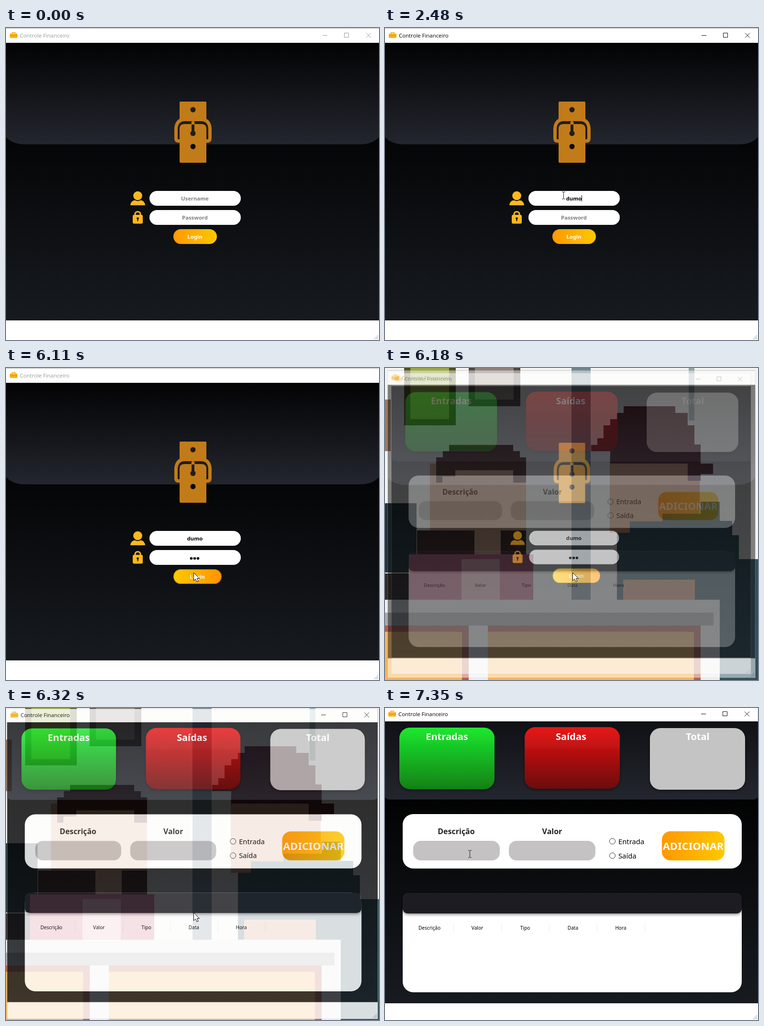
An HTML page that plays this animation: 780 px wide and 653 px high, repeating every 8 s.

```html
<!DOCTYPE html>
<html lang="pt">
<head>
<meta charset="utf-8">
<title>Controle Financeiro</title>
<style>
  html, body { margin: 0; width: 100%; height: 100%; overflow: hidden; background: #fff; }
  svg { display: block; width: 780px; height: 653px; }
  text { font-family: "Noto Sans", sans-serif; }
  .title { font: 11.4px "Open Sans", sans-serif; }
  .bold { font-weight: 700; font-size: 11.3px; text-anchor: middle; }
  .big { font-weight: 700; font-size: 20px; text-anchor: middle; fill: #fff; }
  .label { font-weight: 700; font-size: 16px; text-anchor: middle; fill: #222; }
  .column { font-size: 10.1px; text-anchor: middle; }
  .radio { font-size: 14.8px; }
</style>
</head>
<body>
<svg id="stage" viewBox="0 0 780 653"></svg>
<script>
const LOOP = 8000;
const stage = document.getElementById('stage');

const box = (x, y, w, h, fill, r = 0, extra = '') =>
  `<rect x="${x}" y="${y}" width="${w}" height="${h}" rx="${r}" fill="${fill}" ${extra}/>`;
const dot = (x, y, r, fill, extra = '') => `<circle cx="${x}" cy="${y}" r="${r}" fill="${fill}" ${extra}/>`;
const line = (d, stroke, width = 1) => `<path d="${d}" fill="none" stroke="${stroke}" stroke-width="${width}"/>`;
const text = (cls, x, y, s, extra = '') => `<text class="${cls}" x="${x}" y="${y}" ${extra}>${s}</text>`;
const gradient = (id, from, to, horizontal) =>
  `<linearGradient id="${id}" x2="${horizontal ? 1 : 0}" y2="${horizontal ? 0 : 1}">
    <stop stop-color="${from}"/><stop offset="1" stop-color="${to}"/></linearGradient>`;

const defs = `<defs>
  ${gradient('flap', '#030304', '#23262e')}
  ${gradient('shortFlap', '#101115', '#23262e')}
  <linearGradient id="floor" x2="0" y2="1"><stop offset=".2" stop-color="#000"/>
    <stop offset="1" stop-color="#171b20"/></linearGradient>
  ${gradient('green', '#1ce82f', '#118016')}
  ${gradient('red', '#e81717', '#6b0707')}
  ${gradient('warm', '#ff9800', '#ffc800', true)}
  ${gradient('warmBack', '#ffc800', '#ff9300', true)}
  <filter id="shadow" x="-10%" y="-20%" width="120%" height="150%">
    <feDropShadow dx="0" dy="2" stdDeviation="3" flood-opacity=".5"/></filter>
</defs>`;

function titleBar(left, dy, name) {
  const y = 15.5 + dy, x = left + 659;
  return box(left + 8 - 8, 0, 780, 31 + dy, '#fff') +
    box(left + 8, y - 4, 16, 9.5, '#ffb21c', 1.5) + box(left + 8, y, 16, 1, '#d98500') +
    line(`M${left + 13} ${y - 4}v-2h6v2`, '#f0a010', 1.6) +
    `<g id="${name}Title">${text('title', left + 29, y + 4.5, 'Controle Financeiro')}</g>
    <g id="${name}Buttons" stroke="#111" fill="none">
      <path d="M${x + 3} ${y}h10M${x + 48.5} ${y - 5}h9v9h-9zM${x + 94} ${y - 5}l10 10m0 -10l-10 10"/></g>`;
}

const grip = [[776, 643], [773, 646], [776, 646], [770, 649], [773, 649], [776, 649]]
  .map(([x, y]) => box(x, y, 2, 2, '#bbb')).join('');

function buckle() {
  const gold = '#c27b19', dark = '#211d1b';
  return box(363, 154, 56, 40, gold, 2) +
    box(358, 195, 66, 40, dark, 9) +
    line('M366 236.5H361Q355.5 236.5 355.5 231V210Q357 191.5 374 191.5H408Q425 191.5 426.5 210V231Q426.5 236.5 421 236.5H416', gold, 7) +
    `<path d="M363 211Q363 201 373 201H409Q419 201 419 211V280Q419 282 417 282H365Q363 282 363 280Z" fill="${gold}"/>` +
    dot(391, 198.5, 3.5, gold) + box(388, 202, 6, 18, dark) +
    dot(391, 171, 5.5, dark) + dot(391, 220.5, 5.5, dark) + dot(391, 248, 5.5, '#090808');
}

const loginWindow = box(0, 0, 780, 653, '#fff', 0, 'stroke="#bbb"') + titleBar(0, 0, 'login') +
  box(0, 0, 780, 1, '#aaa') +
  box(0, 31, 780, 581, 'url(#floor)') +
  '<path d="M0 31H780V228Q767 243.500 740 243.500H40Q13 243.500 0 228Z" fill="url(#flap)"/>' +
  buckle() +
  `<g fill="#ffb81c"><circle cx="275.500" cy="351" r="9.300"/>
    <path d="M260 371Q261 361 270 360.500Q275.500 364 281 360.500Q290 361 291 371Z"/>
    <rect x="265" y="391" width="21" height="18.500" rx="3"/></g>` +
  line('M270 392V389.5a5.500 5 0 0 1 11 0V392', '#ffb81c', 3) +
  dot(275.5, 398.5, 2.3, '#111') + box(274.5, 399, 2, 5.5, '#111') +
  box(300, 341, 191, 31, '#fff', 15.5) + box(300, 381, 191, 31, '#fff', 15.5) +
  '<g id="fields"></g><g id="loginButton"></g>' + box(0, 612, 780, 41, '#fff') + grip;

const columns = ['Descrição', 'Valor', 'Tipo', 'Data', 'Hora'].map((name, i) =>
  text('column', 93 + 100 * i, 464, name) + box(143 + 100 * i, 448, 1, 23, '#eee')).join('');
const radio = (y, name) =>
  dot(475.5, y, 6, '#fff', 'stroke="#333"') + text('radio', 488, y + 5.5, name);

const mainWindow = box(0, 0, 780, 653, '#fff', 0, 'stroke="#bbb"') + titleBar(-1, -3, 'main') +
  box(0, 28, 780, 590, 'url(#floor)') +
  '<path d="M0 28H780V187Q776 191.500 770 191.500H10Q4 191.500 0 187Z" fill="url(#shortFlap)"/>' +
  `<g filter="url(#shadow)">${box(30, 41, 199, 129, 'url(#green)', 22)}
    ${box(292, 40, 199, 129, 'url(#red)', 22)}${box(554, 42, 199, 129, '#c4c4c4', 22)}</g>` +
  text('big', 129.5, 67, 'Entradas') + text('big', 389, 67, 'Saídas') + text('big', 654, 67, 'Total') +
  box(37, 222, 709, 114, '#fff', 22) +
  text('label', 149, 264, 'Descrição') + text('label', 349.5, 264, 'Valor') +
  box(59, 278, 181, 41, '#c4c2c2', 16) + box(259, 278, 181, 41, '#c4c2c2', 16) +
  radio(279, 'Entrada') + radio(309, 'Saída') +
  box(579, 258, 131, 61, 'url(#warm)', 18) +
  text('big', 644.5, 297, 'ADICIONAR', 'style="font-size:22px"') +
  box(37, 387, 709, 208, '#fff', 22) +
  box(37, 387, 709, 43, '#1c1d21', 10, 'filter="url(#shadow)"') +
  columns + box(0, 618, 780, 35, '#fff') + grip;

// Blocky desktop scene behind the windows: two plain figures at a table.
const desktop = box(0, 0, 780, 653, '#f4f4f2') +
  box(0, 66, 12, 108, '#9a7a62') + box(40, 0, 108, 120, '#4c4a14') + box(53, 0, 81, 107, '#9aa83c') +
  box(175, 0, 108, 80, '#4a403c') + box(188, 0, 81, 66, '#8c8078') +
  box(390, 0, 40, 485, '#6d8390') + box(635, 0, 12, 110, '#8ca6aa') +
  box(0, 283, 66, 145, '#22333a') + box(0, 430, 50, 110, '#332826') +
  box(94, 200, 201, 200, '#dca684') + box(67, 340, 120, 80, '#40201a') + box(242, 340, 53, 80, '#40201a') +
  '<path d="M107 240V187H121V174H134V161H268V174H282V187H295V240H268V214H147V227H120V240Z" fill="#4a2018"/>' +
  box(50, 390, 260, 95, '#c4607c') + box(160, 400, 80, 85, '#eab0b8') +
  box(470, 185, 188, 160, '#d2946f') +
  '<path d="M431 174V161H444V147H457V120H471V107H485V94H499V80H607V94H633V120H647V160H660V200H686V222H660V236H633V200H471V174Z" fill="#501a20"/>' +
  '<path d="M485 485V345H512V321H580V305H660V280H700V320H726V350H740V400H780V653H700V485Z" fill="#30505a"/>' +
  box(498, 443, 150, 42, '#d89a72') +
  box(0, 485, 700, 168, '#eee') + box(0, 512, 687, 27, '#aaa') +
  box(0, 539, 175, 114, '#b85a44') + box(0, 552, 161, 101, '#f4b45c') +
  box(215, 539, 445, 114, '#b85a44') + box(215, 552, 431, 101, '#f4b45c');

stage.innerHTML = defs + `<g id="desktop">${desktop}</g><g id="main">${mainWindow}</g>
  <g id="login">${loginWindow}</g><g id="cursor"></g>`;
const el = id => document.getElementById(id);

const ARROW = '<path d="M0 0V16.500L4 13L6.500 19L9.500 17.700L7 12H12Z" fill="#fff" stroke="#111"/>';
const BEAM = line('M-3.5 -7.5H-1L0 -6.500L1 -7.500H3.500M0 -6.500V6.500M-3.500 7.500H-1L0 6.500L1 7.500H3.500', '#222');

const cursorPath = [[410, 640, 600], [1000, 373, 350], [4800, 373, 350], [4920, 373, 352],
  [5600, 392, 428], [6400, 392, 428], [6740, 172, 331], [6950, 172, 331], [7300, 177, 305]];
// Rows: time, login opacity, login scale, main opacity, main scale
const windowPath = [[6110, 1, 1, 0, .94], [6180, .5, .985, .5, .963], [6250, .12, .97, .7, .982],
  [6320, 0, .96, .82, .993], [6390, 0, .96, .94, .998], [6460, 0, .96, 1, 1]];

function sample(path, t, ease = k => k) {
  const i = path.findIndex(row => row[0] > t);
  if (i === 0) return path[0].slice(1);
  if (i < 0) return path.at(-1).slice(1);
  const a = path[i - 1], b = path[i], k = ease((t - a[0]) / (b[0] - a[0]));
  return a.slice(1).map((v, j) => v + (b[j + 1] - v) * k);
}
const smooth = k => k * k * (3 - 2 * k);
const typed = (times, t) => times.filter(at => t >= at).length;
const between = (t, a, b) => t >= a && t < b;

function drawFields(t) {
  const name = 'dumo'.slice(0, typed([1750, 2140, 2280, 2420], t));
  const dots = typed([3930, 4130, 4400], t);
  let out = '';
  if (name) out += text('bold', 395, 361, name, 'id="userName"');
  else if (t < 1090) out += text('bold', 395, 361, 'Username', 'fill="#808080"');
  if (t < 2810) out += text('bold', 395, 401, 'Password', 'fill="#808080"');
  for (let i = 0; i < dots; i++) out += dot(394.5 + 7 * (i - (dots - 1) / 2), 398.5, 2.8, '#000');
  el('fields').innerHTML = out;

  const nameWidth = name ? el('userName').getBBox().width : 0;
  let caret = '';
  if (between(t, 1090, 1620) || between(t, 1750, 2810))
    caret = box(Math.round(395 + nameWidth / 2), 350, 1, 13, '#000');
  if (between(t, 3010, 4930) || between(t, 5460, 5970))
    caret = box(Math.round(395 + dots * 3.5), 390, 1, 13, '#000');
  el('fields').innerHTML += caret;
}

function drawButton(t) {
  const hover = t >= 5500, width = hover ? 101 : 91;
  el('loginButton').innerHTML =
    box(350, 421, width, 31, hover ? 'url(#warmBack)' : 'url(#warm)', 15.5) +
    (t >= 5970 ? box(350.5, 421.5, 100, 30, 'none', 15, 'stroke="#222" stroke-dasharray="1 1"') : '') +
    text('bold', 350 + width / 2 - .5, 441, 'Login', 'fill="#fff"');
}

function place(id, opacity, scale, cx, cy) {
  el(id).setAttribute('opacity', opacity);
  el(id).setAttribute('transform', `translate(${cx} ${cy}) scale(${scale}) translate(${-cx} ${-cy})`);
}

function draw(t) {
  const step = Math.floor((t - 20) / 70) * 70 + 20;
  const [loginAlpha, loginScale, mainAlpha, mainScale] = sample(windowPath, step);
  place('login', loginAlpha, loginScale, 390, 326);
  place('main', mainAlpha, mainScale, 370, 300);

  const active = between(t, 1090, 6040);
  el('loginTitle').setAttribute('fill', active ? '#000' : '#999');
  el('loginButtons').setAttribute('stroke', active ? '#111' : '#999');
  el('loginButtons').setAttribute('opacity', t < 6040 ? 1 : 0);
  drawFields(t);
  drawButton(t);

  const [x, y] = sample(cursorPath, step, smooth);
  const beam = between(t, 950, 5200) || t >= 6740;
  el('cursor').innerHTML = t < 410 ? '' :
    `<g transform="translate(${Math.round(x) + .5} ${Math.round(y) + .5})">${beam ? BEAM : ARROW}</g>`;
}

function tick() {
  draw(performance.now() % LOOP);
  requestAnimationFrame(tick);
}
tick();
</script>
</body>
</html>
```
